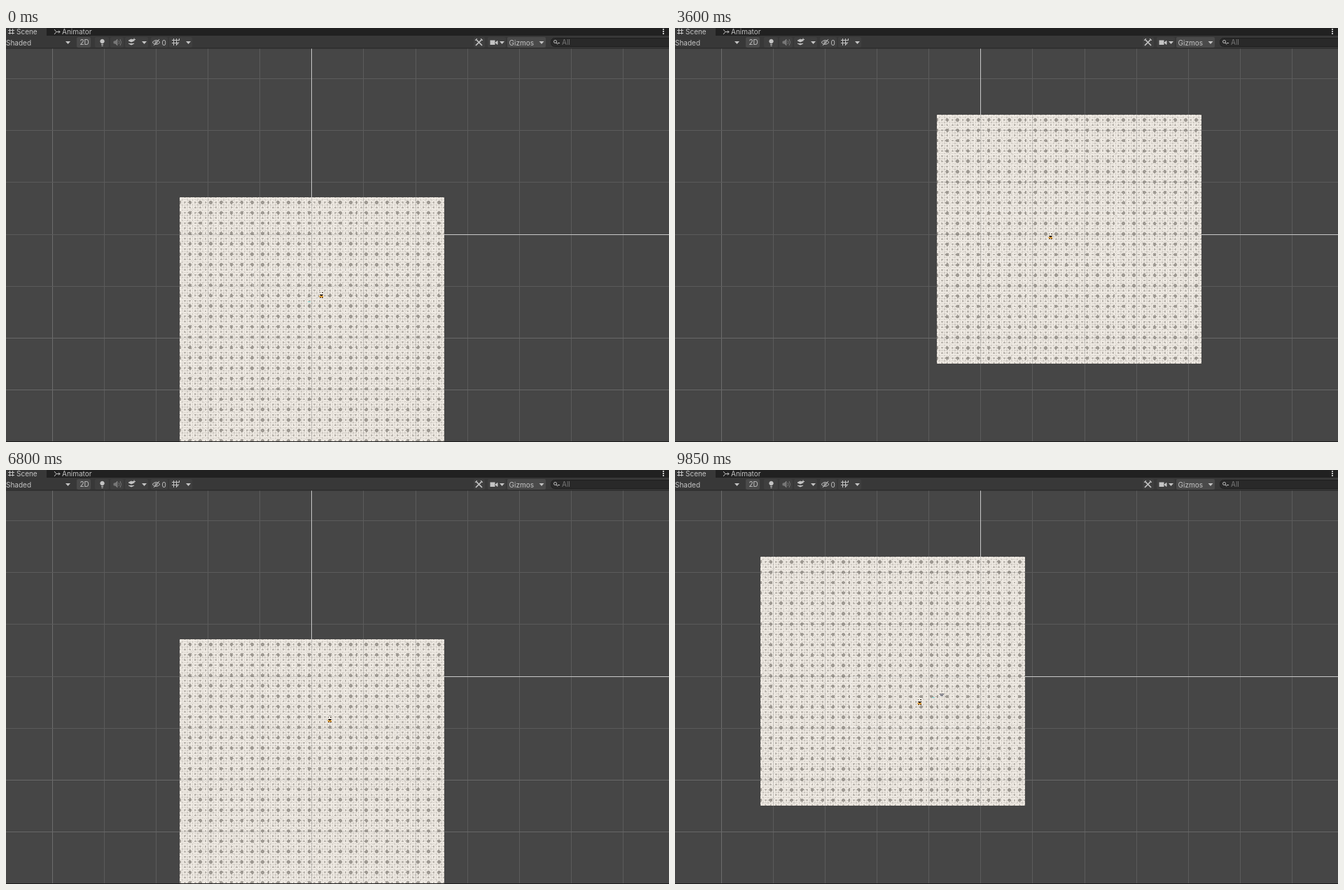
Write an HTML page with a canvas that moves like this. It is 947 by 592 pixels and loops after 9.93 s.

```html
<!DOCTYPE html>
<html lang="en">
<head>
<meta charset="utf-8">
<title>Scene view</title>
<style>
  html, body { margin: 0; width: 100%; height: 100%; overflow: hidden; background: #464646; }
  #stage { position: relative; width: 947px; height: 592px; overflow: hidden; }
  svg, canvas { position: absolute; left: 0; top: 0; display: block; }
  text { font: 10px Inter, Roboto, sans-serif; fill: #c4c4c4; }
</style>
</head>
<body>
<div id="stage">
  <svg width="947" height="592"><rect width="947" height="592" fill="#464646"/><g id="grid" fill="none"></g></svg>
  <canvas id="map" width="378" height="356"></canvas>
  <svg width="947" height="592">
    <clipPath id="mapClip"><rect id="clipBox" width="378" height="356"/></clipPath>
    <g id="overlay" clip-path="url(#mapClip)" opacity=".22" fill="none"></g>
    <rect id="view" width="195" height="72" fill="none" stroke="#fff" stroke-opacity=".35"/>
    <path id="shot" d="M-2 .5h4" stroke="#7fdcd8"/>
    <g id="bat">
      <rect x="-3" y="-2" width="6" height="4" fill="#e9e7e6"/>
      <path d="M-3 -1.5h6M-2 .5h4" stroke="#3a3a48"/>
    </g>
    <g id="hero">
      <rect x="-3" y="-5" width="6" height="9" fill="#f4efe6"/>
      <path d="M-2 -3.5h1M1 -3.5h2M-2 -.5h5M-1 .5h3" stroke="#2c2018"/>
      <path d="M-3 1.5h6M-2 2.5h5" stroke="#d99a32"/>
      <path id="feet" stroke="#5a3316"/>
    </g>

    <rect width="947" height="11" fill="#212121"/>
    <rect width="58" height="11" fill="#383838"/>
    <rect y="11" width="947" height="18" fill="#383838"/>
    <rect y="28.5" width="947" height="1" fill="#242424"/>
    <rect y="591" width="947" height="1" fill="#1b1b1b"/>
    <g id="buttons"></g>
    <rect x="778.5" y="14.5" width="180" height="12" rx="5" fill="#292929" stroke="#1e1e1e"/>
    <g id="arrows" fill="#c4c4c4"></g>
    <text x="15" y="9">Scene</text>
    <text x="80" y="9">Animator</text>
    <text x="0" y="24.5">Shaded</text>
    <text x="105.5" y="24">2D</text>
    <text x="222.5" y="24.5">0</text>
    <text x="718.5" y="24.5">Gizmos</text>
    <text x="794" y="24" style="fill:#777">All</text>
    <g fill="none" stroke="#c4c4c4">
      <path d="M5.5 1v8M9.5 1v8M3 3.5h9M3 7.500h9"/>
      <path d="M69 2l3 3.500h5M69 9l3 -3.500M75 3.500l2 2l-2 2"/>
      <circle cx="137.5" cy="19" r="2.7" fill="#c4c4c4"/>
      <path d="M136 23.5h3M136.5 25.5h2"/>
      <g stroke="#777"><path d="M154 19h2l3 -3v9l-3 -3h-2z" fill="#777"/><path d="M161 18q2 2.500 0 5M163 16q3 4.500 0 9"/></g>
      <path d="M175 18l4 -2l4 2l-4 2zM175 22l4 2l4 -2" fill="#c4c4c4"/>
      <path d="M183 14.5v4M181 16.5h4"/>
      <path d="M209 20.5q5.500 -6 11 0q-5.500 6 -11 0M211 25l8 -9"/><circle cx="214.5" cy="20.5" r="1.5"/>
      <path d="M239.5 15v10M243.5 15v10M237 17.5h10M237 21.5h6M247.5 15v3M243 25l4 -5M244 20l2 3"/>
      <path d="M671 16l9 9M680 16l-9 9" stroke-width="1.7"/>
      <path d="M670 18l3 -3M678 15l3 3"/>
      <rect x="692" y="18" width="6" height="5.5" fill="#c4c4c4"/><path d="M699 21l3 -2.500v5z" fill="#c4c4c4"/>
      <circle cx="784.5" cy="19.5" r="2"/><path d="M786 21l2 2.500M788 21.5h3"/>
    </g>
    <path d="M939 1v8" stroke="#c4c4c4" stroke-width="2" stroke-dasharray="2 1"/>
  </svg>
</div>
<script>
const $ = id => document.getElementById(id);
const LOOP = 9930, CELL = 74.07, TILE = CELL / 10;
const CHUNK = { w: 17 * TILE, h: 16 * TILE };
const ORIGIN = { x: 436.9, y: 295 };
const SPEED = 0.074;

function buildGrid() {
  let lines = '', over = '';
  const add = (d, color) => {
    lines += `<path d="${d}" stroke="${color}"/>`;
    over += `<path d="${d}" stroke="#777"/>`;
  };
  for (let i = -5; i <= 6; i++)
    add(`M${Math.floor(ORIGIN.x + i * CELL) + .5} 29V591`, i === -5 ? '#6c6c6c' : '#5b5b5b');
  for (let i = -3; i <= 3; i++)
    add(`M0 ${Math.floor(ORIGIN.y + i * CELL) + .5}H947`, i < 2 ? '#5b5b5b' : '#686868');
  const ax = Math.floor(ORIGIN.x) + .5, ay = Math.floor(ORIGIN.y) + .5;
  $('grid').innerHTML = lines + `<path d="M${ax} 29V${ay}H947" stroke="#c8c8c8"/>`;
  $('overlay').innerHTML = over + `<path d="M0 ${ay}H${ax}V591" stroke="#444"/>`;
}

function buildBar() {
  const button = (x, w, fill = '#3f3f3f') => `<rect x="${x}" y="13" width="${w}" height="15" rx="2" fill="${fill}"/>`;
  $('buttons').innerHTML = button(101, 20, '#4a4a4a') + button(127, 20) + button(149, 19) + button(170, 33) +
    button(207, 24) + button(233, 33) + button(668, 16) + button(688, 26) + button(716, 55, '#4a4a4a');
  $('arrows').innerHTML = [88.5, 197.5, 260.5, 708.5, 765].map(x => `<path d="M${x - 3.5} 19h7l-3.5 4z"/>`).join('');
}

// Shade of the floor at tile coordinates within a chunk; big dots repeat every second tile.
function floorShade(u, v) {
  const i = Math.round(u), j = Math.round(v);
  const corner = Math.hypot(u - i, v - j);
  const mid = Math.hypot(u - Math.floor(u) - .5, v - Math.floor(v) - .5);
  const big = i % 2 === 0 && j % 2 === 1;
  if (corner < (big ? .33 : .2)) return big ? 158 : 188;
  if (corner < .42) return 240;
  if (mid < .13) return 198;
  if (mid < .3) return 236;
  return 216;
}

function buildMap() {
  const c = $('map'), ctx = c.getContext('2d');
  for (let y = 0; y < c.height; y++)
    for (let x = 0; x < c.width; x++) {
      const s = floorShade((x + .5) / TILE % 17, (y + .5) / TILE % 16);
      ctx.fillStyle = `rgb(${s}, ${s - 5}, ${s - 12})`;
      ctx.fillRect(x, y, 1, 1);
    }
}

// Each leg is a start time and the distance walked along one axis.
const legs = [
  { at: 1090, dy: -84 }, { at: 2280, dx: 86 }, { at: 3640, dy: 90 },
  { at: 5130, dx: -74 }, { at: 6380, dy: -56 }, { at: 7190, dx: -113 }
];

function heroAt(t) {
  const pos = { x: 450, y: 382, moving: false };
  for (const { at, dx = 0, dy = 0 } of legs) {
    const p = (t - at) * SPEED / Math.abs(dx + dy);
    const done = Math.min(1, Math.max(0, p));
    pos.x += dx * done;
    pos.y += dy * done;
    pos.moving ||= p > 0 && p < 1;
  }
  return pos;
}

// The map recentres by one chunk when the hero leaves its middle chunk.
function findJumps() {
  const jumps = [{ at: 0, col: 0, row: 1 }];
  const step = (d, half) => Math.abs(d) > half + 6.8 ? Math.sign(d) : 0;
  for (let at = 0; at < LOOP; at += 5) {
    const { col, row } = jumps[jumps.length - 1], hero = heroAt(at);
    const dc = step(hero.x - 437 - col * CHUNK.w, CHUNK.w / 2);
    const dr = step(hero.y - 299.4 - row * CHUNK.h, CHUNK.h / 2);
    if (dc || dr) jumps.push({ at, col: col + dc, row: row + dr });
  }
  return jumps;
}

// Straight flight from a to b between two times, hidden otherwise.
function fly(t, from, to, a, b) {
  if (t < from || t > to) return null;
  const p = (t - from) / (to - from);
  return { x: a[0] + (b[0] - a[0]) * p, y: a[1] + (b[1] - a[1]) * p };
}

function place(id, pos) {
  const el = $(id);
  el.style.display = pos ? '' : 'none';
  if (pos) el.setAttribute('transform', `translate(${Math.round(pos.x)} ${Math.round(pos.y)})`);
}

function draw(t) {
  const { col, row } = jumps.filter(j => j.at <= t).pop();
  const mx = Math.round(248 + col * CHUNK.w), my = Math.floor(124 + row * CHUNK.h);
  $('map').style.transform = `translate(${mx}px, ${my}px)`;
  $('clipBox').setAttribute('x', mx);
  $('clipBox').setAttribute('y', my);

  const hero = heroAt(t);
  place('hero', hero);
  $('feet').setAttribute('d', hero.moving && Math.floor(t / 140) % 2 ? 'M-1 3.5h3' : 'M-2 3.5h2M1 3.5h2');
  $('view').setAttribute('x', Math.round(hero.x) - 97.5);
  $('view').setAttribute('y', Math.round(hero.y) - 36.5);

  place('bat', fly(t, 7500, LOOP, [426, 310], [379, 322]));
  place('shot', fly(t, 0, 460, [433, 391], [433, 391]) ||
    fly(t, 460, 1800, [433, 391], [407, 409]) ||
    fly(t, 9510, LOOP, [354, 330], [372, 324]));
}

buildGrid();
buildBar();
buildMap();
const jumps = findJumps();
const start = performance.now();
function tick(now) {
  draw(Math.max(0, now - start) % LOOP);
  requestAnimationFrame(tick);
}
draw(0);
requestAnimationFrame(tick);
</script>
</body>
</html>
```
